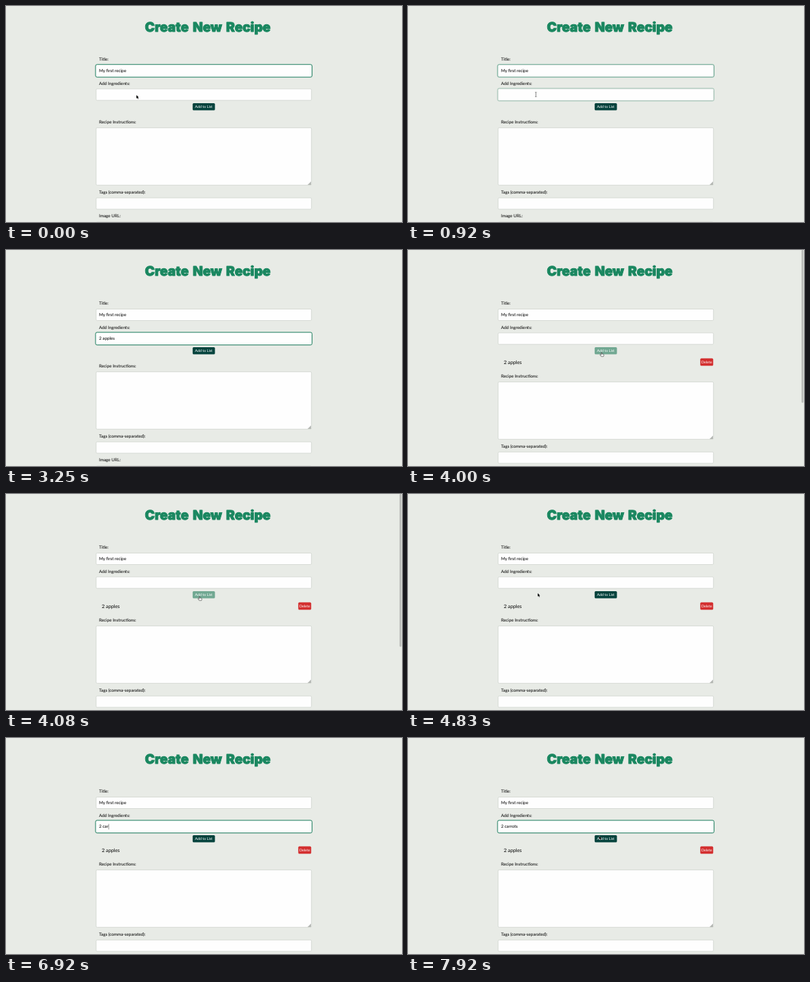
An HTML page for the animation above (8000 ms loop, 583 by 320 pixels).

```html
<!DOCTYPE html>
<html lang="en">
<head>
<meta charset="utf-8">
<title>Create New Recipe</title>
<style>
  html, body { margin: 0; width: 100%; height: 100%; overflow: hidden; background: #e8ebe6; }
  svg { display: block; width: 583px; height: 320px; }
  text { font-family: Lato, "Open Sans", sans-serif; font-size: 6.33px; fill: #111; stroke: #111; stroke-width: .05px; white-space: pre; text-rendering: geometricPrecision; }
  .heading { font: 900 19.4px Inter, sans-serif; letter-spacing: -.15px; word-spacing: 2.4px; fill: #1a8760; stroke: #1a8760; stroke-width: .9px; stroke-linejoin: round; }
  .item { font-size: 7.25px; }
  .small { font-size: 5.4px; fill: #fff; stroke: none; }
  .option { font-size: 5px; stroke: none; }
  .field { fill: #fefefe; stroke: #cbd0c9; stroke-width: .7px; }
  .focus { fill: #fefefe; stroke: #2a8468; stroke-width: 1px; }
  .glow { fill: none; stroke: #198754; stroke-width: 1px; opacity: .2; }
  .caret { fill: #333; }
</style>
</head>
<body>
<svg id="stage" viewBox="0 0 583 320"></svg>
<script>
const DURATION = 8000, STEP = 1000 / 12;
const stage = document.getElementById('stage');

function add(tag, attrs = {}, parent = stage, content = '') {
  const el = document.createElementNS('http://www.w3.org/2000/svg', tag);
  for (const key in attrs) el.setAttribute(key, attrs[key]);
  el.textContent = content;
  parent.append(el);
  return el;
}
const rect = (x, y, width, height, attrs, parent) =>
  add('rect', { x, y, width, height, ...attrs }, parent);
const text = (x, y, content, attrs, parent) => add('text', { x, y, ...attrs }, parent, content);
const field = (y, height, parent) => rect(132.7, y, 317, height, { rx: 1.6, class: 'field' }, parent);

function focusRing(y) {
  const ring = add('g');
  rect(131.4, y - 1.3, 319.6, 19.6, { rx: 2.8, class: 'glow' }, ring);
  rect(131.9, y - .8, 318.6, 18.6, { rx: 2.3, class: 'focus' }, ring);
  return ring;
}

// Form
text(297, 37.6, 'Create New Recipe', { class: 'heading', 'text-anchor': 'middle' });
text(137, 81.2, 'Title:');
field(87.5, 17);
const titleRing = focusRing(87.5);
text(137, 98.1, 'My first recipe');
const titleCaret = rect(176.4, 92, .5, 8, { class: 'caret' });

text(137, 116.7, 'Add Ingredients:');
field(122.8, 17);
const ingredientRing = focusRing(122.8);
const ingredient = text(137, 133.4, '');
const ingredientCaret = rect(137, 127.3, .5, 8.2, { class: 'caret' });

const button = rect(274.8, 144, 32.8, 10.6, { rx: 1.6 });
text(291.2, 151.1, 'Add to List', { class: 'small', 'text-anchor': 'middle' });

const item = add('g');
text(141, 168.5, '2 apples', { class: 'item' }, item);
rect(430.3, 160.6, 19, 11, { rx: 1.6, fill: '#d32f2f' }, item);
text(439.8, 168, 'Delete', { class: 'small', 'text-anchor': 'middle' }, item);

const lower = add('g');
text(137, 173.9, 'Recipe Instructions:', {}, lower);
field(180.4, 85, lower);
add('path', { d: 'M449 260v5h-5z', fill: '#b4b7b3' }, lower);
text(137, 277.7, 'Tags (comma-separated):', {}, lower);
field(284.2, 16.8, lower);
text(137, 313.2, 'Image URL:', {}, lower);
field(320, 17, lower);

// Autocomplete panel
const panel = add('g');
for (const [grow, opacity] of [[3.2, .04], [2.2, .06], [1.3, .08], [.5, .14]])
  rect(132.6 - grow / 2, 139.8 - grow / 4, 317 + grow, 8.1 + grow * 1.25, { rx: 2, fill: '#000', opacity }, panel);
rect(132.6, 139.8, 317, 8.1, { rx: .8, fill: '#fff' }, panel);
text(135.4, 145.7, '2', { class: 'option' }, panel);

const scrollbar = rect(579.4, 0, 2.8, 226.5, { rx: 1.4, fill: '#b9bbb8' });

// Pointer shapes, each with its hot spot at the origin
const pointer = add('g');
const shapes = {
  arrow: add('path', {
    d: 'M0 0V5L1.2 3.9L2.1 5.8L3 5.4L2.1 3.6H3.6Z',
    fill: '#000', stroke: '#fff', 'stroke-width': .5, 'paint-order': 'stroke'
  }, pointer),
  beam: add('path', {
    d: 'M-1.2 -3.4Q0 -3.4 0 -2.7Q0 -3.4 1.2 -3.4M0 -2.7V2.7M-1.2 3.4Q0 3.4 0 2.7Q0 3.4 1.2 3.4',
    fill: 'none', stroke: '#333', 'stroke-width': .6
  }, pointer),
  hand: add('path', {
    d: 'M-.6 .4Q0 -.5 .6 .4V2.5L2.8 3Q3.4 3.2 3.3 4L2.8 6.3H-.6L-2.4 3.9Q-2.2 3 -1.3 3.6L-.6 4.2Z',
    fill: '#fff', stroke: '#111', 'stroke-width': .5, 'stroke-linejoin': 'round'
  }, pointer)
};

// Timing
const POINTER_PATH = [
  [0, 192, 132], [500, 192, 132], [1000, 188, 131], [3500, 188, 131], [3880, 285, 151.5],
  [4400, 285, 151.5], [4820, 191, 147], [5080, 184, 131], [7420, 184, 131], [7900, 281.5, 145.2]
];
const TYPING = [
  ['2 apples', 3900, [2080, 2250, 2420, 2500, 2580, 2670, 2830, 3000]],
  ['2 carrots', DURATION, [5830, 6000, 6170, 6420, 6830, 6920, 7080, 7250, 7420]]
];

const clamp = v => Math.max(0, Math.min(1, v));
const ramp = (t, from, to) => clamp((t - from) / (to - from));
const pulse = (t, a, b, c, d) => ramp(t, a, b) - ramp(t, c, d);
const within = (t, ...spans) => spans.some(([from, to]) => t >= from && t < to);
const show = (el, visible) => el.setAttribute('visibility', visible ? 'visible' : 'hidden');
const mix = (a, b, k) => `rgb(${a.map((v, i) => Math.round(v + (b[i] - v) * k))})`;

function pointerAt(t) {
  const next = POINTER_PATH.findIndex(p => p[0] > t);
  if (next < 0) return POINTER_PATH.at(-1).slice(1);
  const [t0, x0, y0] = POINTER_PATH[next - 1], [t1, x1, y1] = POINTER_PATH[next];
  const k = ramp(t, t0, t1), eased = k * k * (3 - 2 * k);
  return [x0 + (x1 - x0) * eased, y0 + (y1 - y0) * eased];
}

function typedAt(t) {
  const entry = TYPING.find(([, end, keys]) => t >= keys[0] && t < end);
  return entry ? entry[0].slice(0, entry[2].filter(key => key <= t).length) : '';
}

function render(time) {
  const t = Math.floor((time + 4) / STEP) * STEP;

  titleRing.setAttribute('opacity', 1 - ramp(t, 830, 1080));
  ingredientRing.setAttribute('opacity', pulse(t, 830, 1080, 3830, 4000) + ramp(t, 5080, 5250));
  show(titleCaret, within(t, [330, 830]));

  ingredient.textContent = typedAt(t);
  ingredientCaret.setAttribute('x', 137.1 + ingredient.getComputedTextLength());
  show(ingredientCaret, within(t, [1000, 1500], [2160, 3250], [5160, 7910]));
  show(panel, within(t, [2160, 2420], [5910, 6170]));

  const added = t >= 3900;
  show(item, added);
  lower.setAttribute('transform', `translate(0 ${added ? 15 : 0})`);
  button.setAttribute('fill', mix([5, 67, 61], [113, 168, 146], pulse(t, 3750, 3950, 4410, 4600)));
  scrollbar.setAttribute('opacity', added ? 1 - ramp(t, 4330, 4600) : 0);

  const [x, y] = pointerAt(t);
  const onButton = x > 275 && x < 307.5 && y > 146 && y < 154.5;
  const onField = t >= 580 && y > 122 && y < 140;
  const shape = onButton ? 'hand' : onField ? 'beam' : 'arrow';
  pointer.setAttribute('transform', `translate(${x} ${y})`);
  const visible = !within(t, [2080, 3500], [5830, 7420]);
  for (const name in shapes) show(shapes[name], visible && name === shape);
}

const start = performance.now();
function loop() {
  render((performance.now() - start) % DURATION);
  requestAnimationFrame(loop);
}
loop();
</script>
</body>
</html>
```
